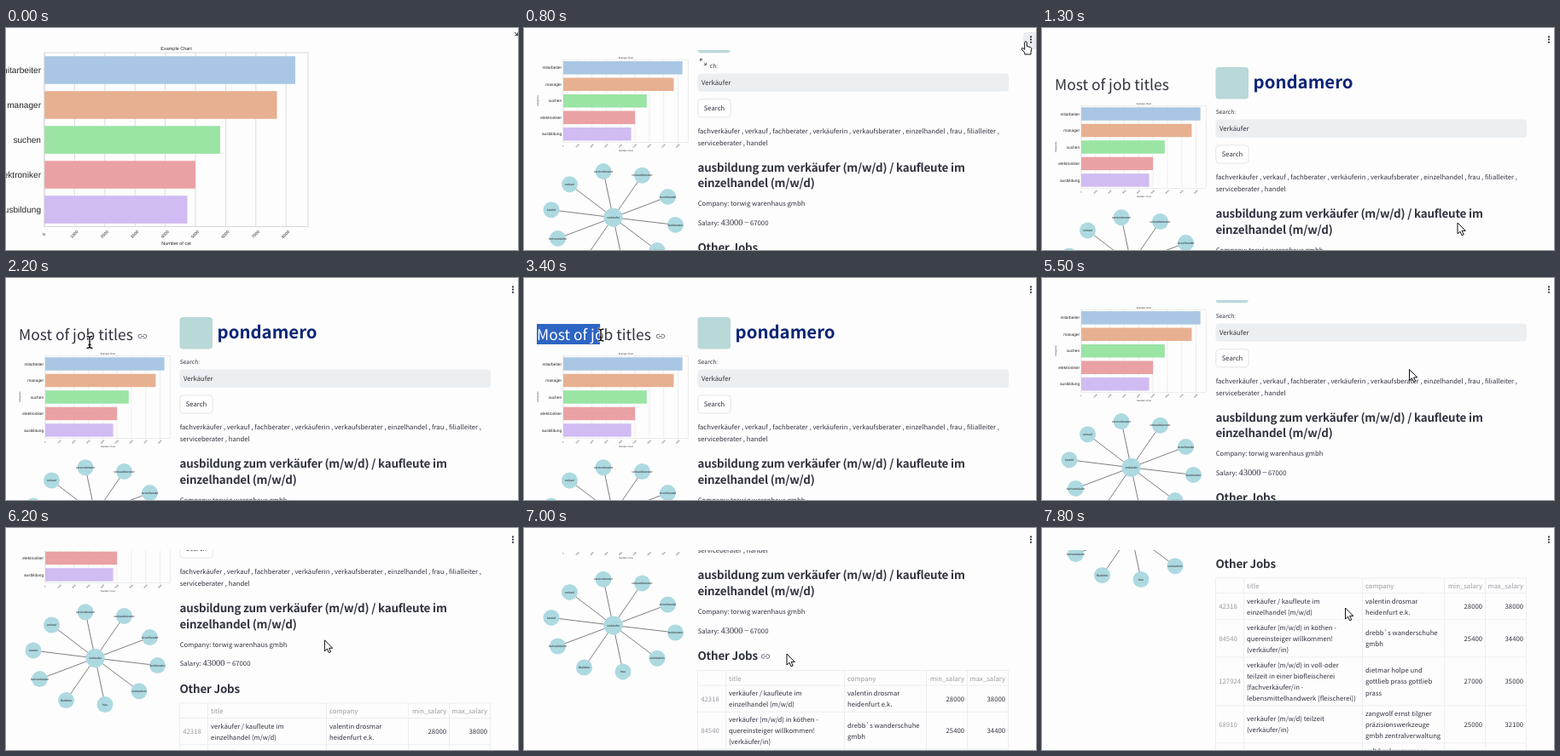
An HTML page that plays this animation: 600x261 px, repeating every 8 s.

```html
<!DOCTYPE html>
<html lang="de">
<head>
<meta charset="utf-8">
<title>Job dashboard</title>
<style>
  html, body { margin: 0; width: 100%; height: 100%; overflow: hidden; background: #fdfdfd; }
  svg { display: block; }
  text { fill: #31333f; font-family: "Noto Sans CJK JP", "Noto Sans CJK SC", "Noto Sans CJK", "Noto Sans", sans-serif; text-rendering: geometricPrecision; white-space: pre; }
  .body { font-size: 7.72px; }
  .label { font-size: 6.75px; }
  .h2 { font-size: 17.45px; }
  .h3 { font-size: 13.4px; font-weight: 700; letter-spacing: -.2px; }
  .dim { font-size: 7.72px; fill: #989aa2; }
  .math { font: 10.4px "Liberation Serif", serif; }
  .brand { font-size: 20.4px; font-weight: 700; fill: #0c2577; }
  .sel { fill: #fff; }
  .plot { font-family: "Liberation Sans", Arial, sans-serif; fill: #262626; }
  .mid { text-anchor: middle; }
  .end { text-anchor: end; }
  .icon { fill: none; stroke: #6b6d76; stroke-width: 1; }
</style>
</head>
<body>
<svg id="stage" width="600" height="261" viewBox="0 0 600 261"></svg>
<script>
const BG = '#fdfdfd';
const stage = document.getElementById('stage');

function add(parent, tag, attrs = {}, content) {
  const el = document.createElementNS('http://www.w3.org/2000/svg', tag);
  for (const k in attrs) el.setAttribute(k, attrs[k]);
  if (content !== undefined) el.textContent = content;
  parent.appendChild(el);
  return el;
}
const group = (p, attrs) => add(p, 'g', attrs);
const text = (p, x, y, s, cls, more) => add(p, 'text', { x, y, class: cls, ...more }, s);
const rect = (p, x, y, width, height, fill, more) => add(p, 'rect', { x, y, width, height, fill, ...more });
const line = (p, x1, y1, x2, y2, stroke, w = .7) =>
  add(p, 'line', { x1, y1, x2, y2, stroke, 'stroke-width': w });
const path = (p, d, more) => add(p, 'path', { d, ...more });

function drawChart(g) {
  const bars = [
    ['mitarbeiter', 339, '#a9c7e4'], ['manager', 317.5, '#e7b090'], ['suchen', 251, '#9ae4a4'],
    ['elektroniker', 222, '#eaa1a3'], ['ausbildung', 212.5, '#d0bbf2']
  ];
  for (let i = 0; i < 9; i++) {
    const x = 45 + i * 35.4;
    line(g, x, 29, x, 233.5, '#cfcfcf');
    text(g, x, 244, i * 1000, 'plot mid', { 'font-size': 4.9, transform: `rotate(-45 ${x} 243)` });
  }
  bars.forEach(([name, end, color], i) => {
    const y = 33.2 + i * 41;
    rect(g, 45, y, end - 45, 32.6, color);
    text(g, 41, y + 19.8, name, 'plot end', { 'font-size': 10.1 });
  });
  rect(g, 45, 29, 309, 204.5, 'none', { stroke: '#cfcfcf', 'stroke-width': .8 });
  text(g, 199.5, 26, 'Example Chart', 'plot mid', { 'font-size': 5.5 });
  text(g, 199.5, 255.2, 'Number of cat', 'plot mid', { 'font-size': 5.5 });
  text(g, -15, 131, 'Categories', 'plot mid', { 'font-size': 5.5, transform: 'rotate(-90 -15 131)' });
}

function drawNetwork(g) {
  const cx = 104.5, cy = 277;
  const nodes = [
    ['serviceberater', 93, 222.8], ['verkaufsberater', 138.5, 227.5], ['einzelhandel', 168.5, 252.6],
    ['fachberater', 177.5, 285.6], ['verkäuferin', 156, 315.8], ['frau', 116, 331.5],
    ['filialleiter', 70.5, 326.6], ['fachverkäufer', 39.5, 301.6], ['handel', 32, 268], ['verkauf', 53.5, 238]
  ];
  for (const [, x, y] of nodes) line(g, cx, cy, x, y, '#555', .75);
  for (const [name, x, y] of [...nodes, ['verkäufer', cx, cy]]) {
    add(g, 'circle', { cx: x, cy: y, r: x === cx ? 11 : 9.5, fill: '#add9e1' });
    text(g, x, y + 1.2, name, 'plot mid', { 'font-size': 3.5 });
  }
}

function drawTable(g) {
  const cols = [203.5, 236.5, 375.5, 471.5, 519.5, 567.5];
  const rows = [
    [42318, ['verkäufer / kaufleute im', 'einzelhandel (m/w/d)'],
      ['valentin drosmar', 'heidenfurt e.k.'], 28000, 38000, 31.2],
    [84540, ['verkäufer (m/w/d) in köthen -', 'quereinsteiger willkommen!', '(verkäufer/in)'],
      ['drebb`s wanderschuhe', 'gmbh'], 25400, 34400, 44],
    [127924, ['verkäufer (m/w/d) in voll-oder', 'teilzeit in einer biofleischerei',
      '(fachverkäufer/in -', 'lebensmittelhandwerk (fleischerei))'],
      ['dietmar holpe und', 'gottlieb prass gottlieb', 'prass'], 27000, 35000, 57],
    [68910, ['verkäufer (m/w/d) teilzeit', '(verkäufer/in)'],
      ['zangwolf ernst tilgner', 'präzisionswerkzeuge', 'gmbh zentralverwaltung'], 25000, 32100, 44],
    [51207, ['verkäufer (m/w/d)'], ['velt hacker germany', 'retail', 'gmbh'], 26000, 33000, 44]
  ];
  const edge = '#e6e7ea';
  const lines = (x, mid, list) =>
    list.forEach((s, i) => text(g, x, mid + 3 + (i - (list.length - 1) / 2) * 13.2, s, 'body'));
  const top = 330;
  let y = top + 17.6;
  line(g, 203.5, top, 567.5, top, edge);
  text(g, 240, top + 12.3, 'title', 'dim');
  text(g, 379, top + 12.3, 'company', 'dim');
  text(g, 516, top + 12.3, 'min_salary', 'dim end');
  text(g, 564, top + 12.3, 'max_salary', 'dim end');
  for (const [id, title, company, min, max, h] of rows) {
    const mid = y + h / 2;
    line(g, 203.5, y, 567.5, y, edge);
    text(g, 207.3, mid + 3, id, 'dim');
    lines(240, mid, title);
    lines(379, mid, company);
    text(g, 516, mid + 3, min, 'body end');
    text(g, 564, mid + 3, max, 'body end');
    y += h;
  }
  for (const x of cols) line(g, x, top, x, y, edge);
}

function expandIcon(p, x, y) {
  const g = group(p, { transform: `translate(${x} ${y})` });
  path(g, 'M-3.5-.8V-3.5H-.8M-3.5-3.5L-.9-.9M3.5.8V3.5H.8M3.5 3.5L.9.9', { class: 'icon' });
  return g;
}
function linkIcon(p, x, y) {
  const g = group(p, { transform: `translate(${x} ${y})` });
  path(g, 'M-.9-2.2H-2.6A2.2 2.2 0 0 0-2.6 2.2H-.9M.9-2.2H2.6A2.2 2.2 0 0 1 2.6 2.2H.9M-1.9 0H1.9',
    { class: 'icon' });
  return g;
}

// Scrolling page
const page = group(stage);
text(page, 15, 73, 'Most of job titles', 'h2');
const clip = add(add(stage, 'defs'), 'clipPath', { id: 'selection' });
const selBox = rect(clip, 15, 54, 0, 24, '#000');
const selection = group(page, { 'clip-path': 'url(#selection)' });
rect(selection, 15, 54, 136, 24, '#2e64c4');
text(selection, 15, 73, 'Most of job titles', 'h2 sel');
const titleLink = linkIcon(page, 160, 68.5);
const popup = group(page);
rect(popup, 140.5, 39, 15, 14, '#e4e9f2', { rx: 2 });
rect(popup, 144, 42, 8, 8, '#3f7de0');

drawChart(group(page, { transform: 'translate(46 101) scale(.475) translate(-45 -49.5)' }));
drawNetwork(page);

rect(page, 203.5, 46, 38.5, 37.5, '#b9d8d8', { rx: 4 });
text(page, 247.5, 71, 'pondamero', 'brand');
const logoExpand = expandIcon(page, 583, 53.5);
text(page, 203.7, 101.2, 'Search:', 'label');
const chartExpand = group(page);
rect(chartExpand, 203, 87, 14.5, 14.5, BG, { rx: 2 });
expandIcon(chartExpand, 210, 94.2);
rect(page, 203.5, 107.6, 364.5, 21.4, '#ebeff2', { rx: 4 });
text(page, 208, 121.3, 'Verkäufer', 'body');
rect(page, 203.8, 137.8, 38.4, 21.2, '#fff', { rx: 4, stroke: '#d9dadd', 'stroke-width': .7 });
text(page, 223, 151.3, 'Search', 'body mid');
text(page, 203.7, 178,
  'fachverkäufer , verkauf , fachberater , verkäuferin , verkaufsberater , einzelhandel , frau , filialleiter ,', 'body');
text(page, 203.7, 192, 'serviceberater , handel', 'body');
text(page, 203.5, 223, 'ausbildung zum verkäufer (m/w/d) / kaufleute im', 'h3');
text(page, 203.5, 241.5, 'einzelhandel (m/w/d)', 'h3');
text(page, 203.7, 263.6, 'Company: torwig warenhaus gmbh', 'body');
text(page, 203.7, 286.3, 'Salary:', 'body');
text(page, 230.5, 286.3, '43000', 'math');
text(page, 258, 286.3, '−', 'math');
text(page, 265, 286.3, '67000', 'body');
text(page, 203.5, 317.5, 'Other Jobs', 'h3');
const jobsLink = linkIcon(page, 283, 313.6);
drawTable(page);

// Fixed header
rect(stage, 0, 0, 600, 26, BG);
const menuHover = rect(stage, 585, 5, 20, 20, '#e9ecf2', { rx: 4 });
for (const y of [10.4, 13.6, 16.8]) add(stage, 'circle', { cx: 594, cy: y, r: 1.1, fill: '#31333f' });

// Fullscreen chart
const full = group(stage);
rect(full, 0, 0, 600, 261, BG);
drawChart(full);
path(full, 'M596 5L599.5 8.5M599.6 5.4V8.6H596.4', { class: 'icon', style: 'stroke:#31333f' });

// Pointers, drawn around their hot spots
const pointer = group(stage);
const ink = { fill: '#fff', stroke: '#111', 'stroke-width': 1, 'stroke-linejoin': 'round' };
const beam = 'M-3.5-7Q0-7 0-5V5Q0 7-3.5 7M3.5-7Q0-7 0-5M3.5 7Q0 7 0 5M-1.6 3H1.6';
const shapes = { arrow: group(pointer), hand: group(pointer), beam: group(pointer) };
path(shapes.arrow, 'M0 0V13L3 10.2L5 14.8L7.2 13.9L5.2 9.4H9.3Z', ink);
path(shapes.hand, 'M-1.3 1.2Q0-.8 1.3 1.2V6L5.4 7Q7 7.6 6.8 9.4L6 13V15.5H-1.2V13.6L-4.8 9.4Q-5.2 7.6-3.2 8.2L-1.3 9.8Z', ink);
path(shapes.beam, beam, { fill: 'none', stroke: '#fff', 'stroke-width': 3 });
path(shapes.beam, beam, { fill: 'none', stroke: '#111', 'stroke-width': 1.4 });

// Tracks: [time, value...]
const scroll = [[0, 54.2], [1100, 54.2], [1200, 24], [1300, 0], [5300, 0], [5400, 36], [5500, 54.2],
  [5700, 54.2], [5800, 84], [5900, 102], [6000, 108.4], [6100, 108.4], [6200, 124], [6300, 149],
  [6400, 162.6], [7300, 162.6], [7400, 184], [7600, 242], [7700, 262], [7800, 271]];
const move = [[200, 597, 6], [300, 593.5, 7.5], [700, 593.5, 7.5], [800, 588, 15.5], [900, 576, 42],
  [1200, 494, 215], [1400, 480, 243], [1800, 480, 243], [2000, 345, 185], [2200, 98, 75.5],
  [2700, 28, 67], [2800, 18, 67], [3600, 114, 67], [4200, 149, 67], [4400, 149, 67],
  [4500, 270, 67], [4600, 399.5, 67.5], [5200, 402, 69], [5300, 402, 69], [5500, 430.5, 107.5],
  [6000, 390, 128], [6100, 390, 128], [6600, 307, 147], [6700, 307, 147], [6800, 308, 148],
  [7000, 308, 148], [7200, 355.5, 94]];
const select = [[2800, 0], [2900, 12], [3600, 99], [4200, 136]];

function at(track, t) {
  const i = track.findIndex(k => k[0] > t);
  if (i === 0) return track[0].slice(1);
  if (i < 0) return track[track.length - 1].slice(1);
  const a = track[i - 1], b = track[i], f = (t - a[0]) / (b[0] - a[0]);
  return a.slice(1).map((v, n) => v + (b[n + 1] - v) * f);
}
const show = (el, on) => el.setAttribute('visibility', on ? 'visible' : 'hidden');

function render(ms) {
  const t = Math.floor(ms % 8000 / 100) * 100;
  const within = (a, b) => t >= a && t < b;
  const [x, y] = at(move, t);
  page.setAttribute('transform', `translate(0 ${-at(scroll, t)[0]})`);
  pointer.setAttribute('transform', `translate(${x} ${y})`);
  selBox.setAttribute('width', t < 5000 ? at(select, t)[0] : 0);
  const kind = within(800, 900) ? 'hand' : within(2200, 4500) ? 'beam' : 'arrow';
  for (const k in shapes) show(shapes[k], k === kind && t >= 200);
  show(full, t < 800);
  show(menuHover, within(800, 900));
  show(chartExpand, within(800, 1000));
  show(titleLink, within(2200, 4500));
  show(popup, within(4500, 5000));
  show(logoExpand, within(4500, 5400));
  show(jobsLink, within(6600, 7100));
}

const start = performance.now();
function tick() {
  render(performance.now() - start);
  requestAnimationFrame(tick);
}
tick();
</script>
</body>
</html>
```
